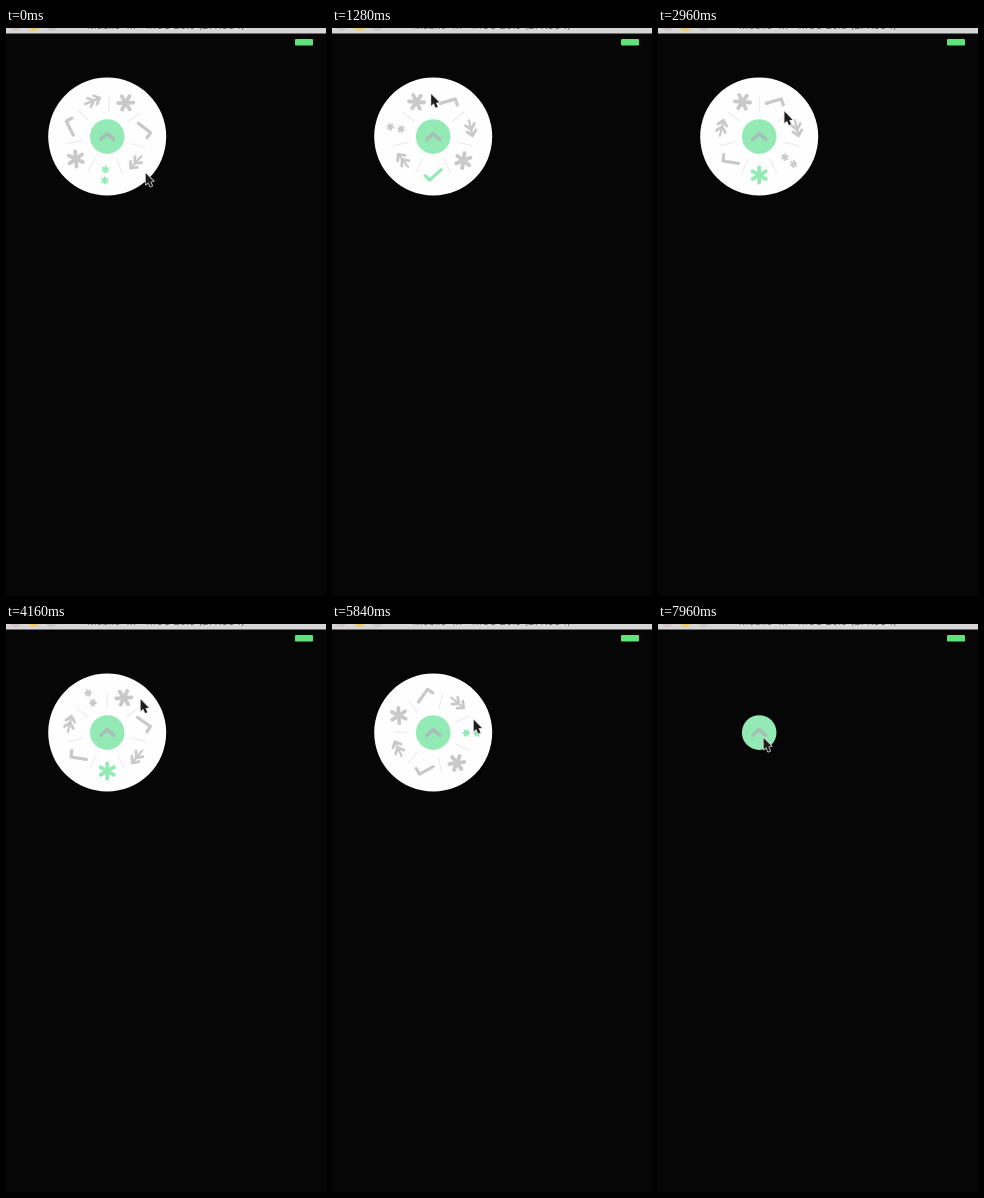
These frames come from a looping animation (320x568 px, 8 s). An HTML page with a canvas:

```html
<!DOCTYPE html>
<html lang="en">
<head>
<meta charset="utf-8">
<title>Radial menu</title>
<style>
html, body { margin: 0; width: 100%; height: 100%; overflow: hidden; background: #060606; }
canvas { display: block; width: 320px; height: 568px; filter: blur(0.45px); }
</style>
</head>
<body>
<canvas width="320" height="568"></canvas>
<script>
const canvas = document.querySelector("canvas");
const ctx = canvas.getContext("2d");
const ratio = window.devicePixelRatio || 1;
canvas.width = 320 * ratio;
canvas.height = 568 * ratio;

const LOOP = 8000, TAU = Math.PI * 2, STEP = 360 / 7, REST = 160;
const CX = 101.2, CY = 108.6, OPEN_RADIUS = 59, HUB_RADIUS = 17.3;
const GREEN = "#93eab5", GREY = "#c9c9c9";
const ICONS = ["stars", "asterisk", "check", "arrow", "asterisk", "check", "arrow"];

// The pointer takes hold at an angle and distance from the hub, then turns the wheel by whole steps.
const gesture = (start, grip, reach, steps = 0, duration = 680) =>
  ({ start, grip, reach, steps, end: start + duration, release: grip + steps * STEP });

const tapOutside = gesture(6740, 6, 173, 0, 180);
const GESTURES = [
  gesture(-70, 40, 53.5, 2),
  gesture(1280, 268, 42.5, 0, 280),
  gesture(2120, 110, 36, 4),
  gesture(3480, 110, 47.5, 4),
  gesture(4720, 110, 46, 4),
  gesture(5540, 72, 43, -2, 390),
  tapOutside,
  gesture(7600, 48, 7.4)
];

const rad = degrees => degrees * Math.PI / 180;
const mod = (n, m) => ((n % m) + m) % m;
const mix = (a, b, p) => a + (b - a) * p;

function ease(t, start, end) {
  const p = Math.min(1, Math.max(0, (t - start) / (end - start)));
  return p * p * (3 - 2 * p);
}

function wheelAngle(t) {
  return GESTURES.reduce((sum, g) => sum + g.steps * STEP * ease(t, g.start, g.end), 90);
}

function selectedIcon(t) {
  const turned = GESTURES.filter(g => g.end <= t).reduce((sum, g) => sum + g.steps, 0);
  return mod(-turned, ICONS.length);
}

// Follows the current gesture, then glides the short way round to the next one.
function pointerPosition(t) {
  const index = GESTURES.filter(g => g.start <= t).length - 1;
  const current = GESTURES[index], next = GESTURES[index + 1] || current;
  let angle = mix(current.grip, current.release, ease(t, current.start, current.end));
  let reach = current.reach;
  if (next !== current) {
    const rest = Math.min(REST, (next.start - current.end) / 4);
    const glide = ease(t, current.end + rest, next.start - rest);
    angle += (mod(next.grip - current.release + 180, 360) - 180) * glide;
    reach = mix(reach, next.reach, glide);
  }
  return [CX + reach * Math.cos(rad(angle)), CY + reach * Math.sin(rad(angle))];
}

function disc(x, y, r, color) {
  ctx.fillStyle = color;
  ctx.beginPath();
  ctx.arc(x, y, r, 0, TAU);
  ctx.fill();
}

function line(points, color, width) {
  ctx.strokeStyle = color;
  ctx.lineWidth = width;
  ctx.beginPath();
  points.forEach(([x, y]) => ctx.lineTo(x, y));
  ctx.stroke();
}

function star(y, r, color, width) {
  for (let i = 0; i < 3; i++) {
    const a = Math.PI / 2 + i * Math.PI / 3;
    const dx = r * Math.cos(a), dy = r * Math.sin(a);
    line([[-dx, y - dy], [dx, y + dy]], color, width);
  }
}

const drawIcon = {
  asterisk: color => star(0, 7.6, color, 3.8),
  stars(color) {
    for (const y of [-5.5, 5.5]) star(y, 3, color, 2);
  },
  check: color => line([[-8, 0.5], [-3.5, 5], [8, -5.5]], color, 3.2),
  arrow(color) {
    line([[-7, 0], [8, 0]], color, 2.2);
    for (const x of [-8, -1.5]) line([[x + 5, -4.5], [x, 0], [x + 5, 4.5]], color, 2.8);
  }
};

function drawWheel(t) {
  const closing = ease(t, tapOutside.start, tapOutside.start + 130);
  if (closing < 1) {
    const angle = wheelAngle(t), selected = selectedIcon(t);
    const scale = mix(1, HUB_RADIUS / OPEN_RADIUS, closing);
    ctx.save();
    ctx.translate(CX, CY);
    ctx.scale(scale, scale);
    disc(0, 0, OPEN_RADIUS, "#fefefe");
    ICONS.forEach((name, i) => {
      ctx.save();
      ctx.rotate(rad(angle + i * STEP - 90));
      ctx.translate(0, 38.5);
      drawIcon[name](i === selected ? GREEN : GREY);
      ctx.restore();
      ctx.save();
      ctx.rotate(rad(angle + (i + 0.5) * STEP));
      line([[25, 0], [40, 0]], "#e9e9e9", 1);
      ctx.restore();
    });
    ctx.restore();
  }
  disc(CX, CY, HUB_RADIUS, GREEN);
  if (t < tapOutside.start || t > tapOutside.end) {
    line([[CX - 6.5, CY + 2.7], [CX, CY - 3], [CX + 6.5, CY + 2.7]], "#a9bdb8", 3.5);
  }
}

function drawPointer(t) {
  ctx.save();
  ctx.translate(...pointerPosition(t));
  ctx.beginPath();
  [[-0.5, 0], [-0.5, 11.5], [2, 9.2], [4, 13.6], [6, 12.7], [4.2, 8.5], [7.5, 8.2]]
    .forEach(([x, y]) => ctx.lineTo(x, y));
  ctx.closePath();
  ctx.strokeStyle = "#dedede";
  ctx.lineWidth = 1.5;
  ctx.stroke();
  ctx.fillStyle = "#1c1c1c";
  ctx.fill();
  ctx.restore();
}

function drawScreen() {
  ctx.fillStyle = "#060606";
  ctx.fillRect(0, 0, 320, 568);
  ctx.fillStyle = "#d6d6d6";
  ctx.fillRect(0, 0, 320, 5.5);
  ["#cfc4c4", "#eecb68", "#c6c6c6"].forEach((color, i) => disc(9.5 + 18 * i, -3, 6, color));
  ctx.fillStyle = "#666";
  ctx.font = "10.5px Inter, sans-serif";
  ctx.textAlign = "center";
  ctx.fillText("Mobile 4x - mOS 20.5 (27K384)", 160, 1);
  ctx.fillStyle = "#5ee27a";
  ctx.beginPath();
  ctx.roundRect(289, 11, 18, 6.5, 1);
  ctx.fill();
}

function render(now) {
  const t = now % LOOP;
  ctx.setTransform(ratio, 0, 0, ratio, 0, 0);
  ctx.lineCap = ctx.lineJoin = "round";
  drawScreen();
  drawWheel(t);
  drawPointer(t);
}

const start = performance.now();
function tick() {
  render(performance.now() - start);
  requestAnimationFrame(tick);
}
tick();
</script>
</body>
</html>
```
